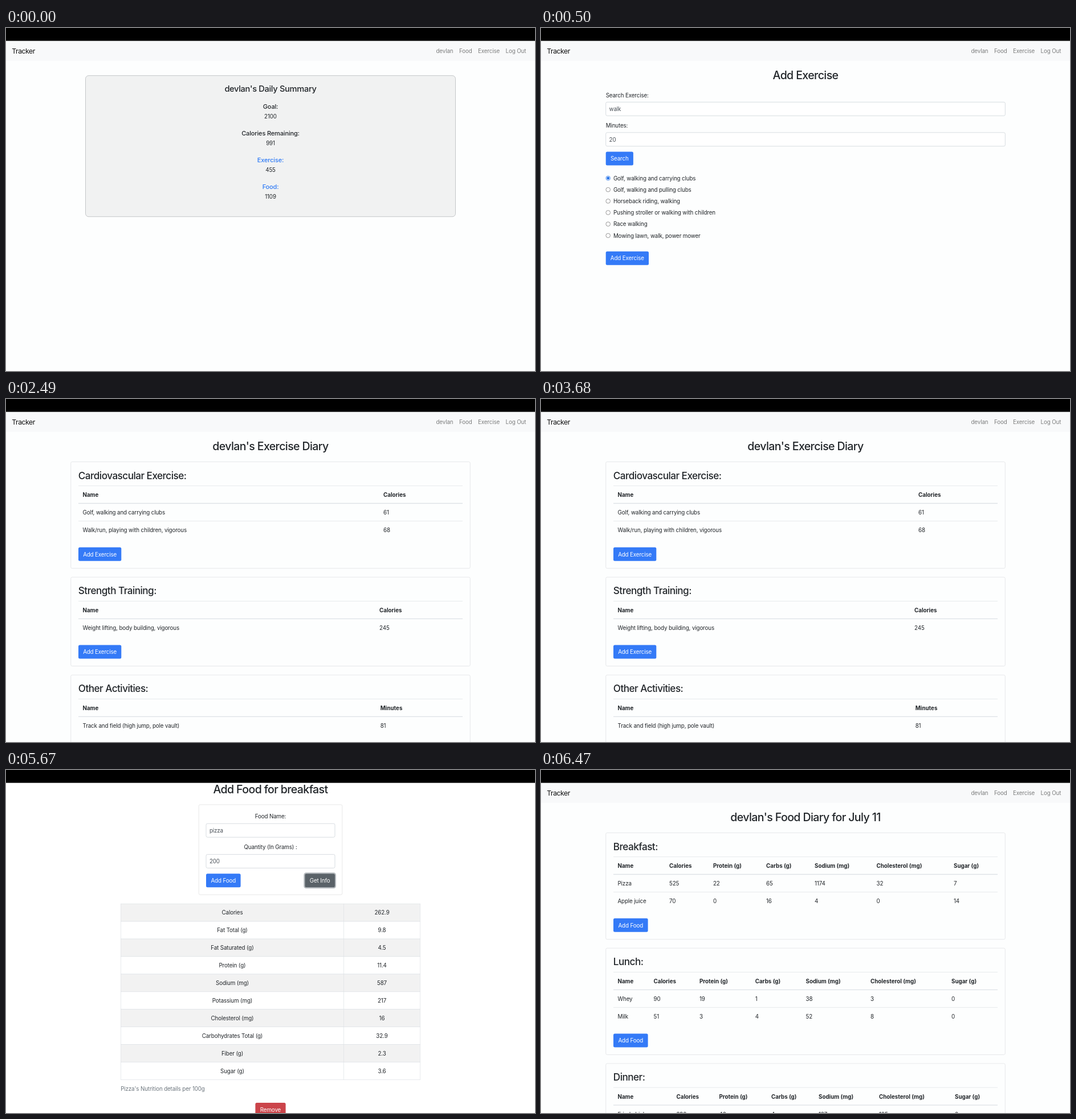
An HTML page for the animation above (8 s loop, 928 px wide and 603 px high).

```html
<!DOCTYPE html>
<html lang="en">
<head>
<meta charset="utf-8">
<title>Tracker</title>
<style>
html, body { margin: 0; width: 100%; height: 100%; overflow: hidden; background: #fff; }
svg { display: block; width: 928px; height: 603px; }
text { font: 400 9.78px Inter, "Open Sans", sans-serif; font-optical-sizing: none; letter-spacing: -.012em; fill: #212529; }
.mid { text-anchor: middle; }
.h2 { font-size: 19.55px; font-weight: 500; letter-spacing: -.031em; }
.h3 { font-size: 17.11px; font-weight: 500; letter-spacing: -.03em; }
.h4 { font-size: 14.67px; font-weight: 500; letter-spacing: -.023em; }
.h5 { font-size: 11px; font-weight: 500; letter-spacing: -.014em; }
.brand { font-size: 12.22px; letter-spacing: -.037em; fill: #111; }
.th { font-weight: 700; letter-spacing: 0; }
.link { fill: #2f7bf6; }
.nav { fill: #7c7d7d; }
.field { fill: #495057; }
.note { fill: #6c757d; }
.label { fill: #fff; }
</style>
</head>
<body>
<svg id="stage" viewBox="0 0 928 603"></svg>
<script>
const USER = 'devlan', BLUE = '#347af7', LINE = '#dee2e6', LEFT = 113.7, MID = 464;

const text = (x, y, s, cls = '') => `<text x="${x}" y="${y}" class="${cls}">${s}</text>`;
const center = (y, s, cls = '', x = MID) => text(x, y, s, 'mid ' + cls);
const box = (x, y, w, h, fill, stroke = 'none', r = 2.5, sw = .7) =>
  `<rect x="${x}" y="${y}" width="${w}" height="${h}" rx="${r}" fill="${fill}" stroke="${stroke}" stroke-width="${sw}"/>`;
const rule = (x1, y1, x2, y2, sw = .7) =>
  `<path d="M${x1} ${y1}L${x2} ${y2}" stroke="${LINE}" stroke-width="${sw}"/>`;
const button = (x, y, w, s, fill = BLUE) =>
  box(x, y, w, 24, fill) + center(y + 15.7, s, 'label', x + w / 2);
const input = (x, y, w, s) =>
  box(x, y, w, 24, '#fff', '#c8ced4') + text(x + 5.9, y + 15.7, s, 'field');

const page = body => box(0, 22, 928, 581, '#fdfefe', 'none', 0) +
  box(0, 22, 928, 35.5, '#f8f9fa', 'none', 0) + text(10.3, 45.2, 'Tracker', 'brand') +
  [[754.5, USER], [795, 'Food'], [828, 'Exercise'], [876.5, 'Log Out']]
    .map(([x, s]) => text(x, 44.3, s, 'nav')).join('') + body;

// Titled card with a table; the first row holds the headings.
function card(top, title, xs, rows, action, width) {
  const [head, ...data] = rows.map(r => r.split('|'));
  const extra = 31 * (data.length - 1);
  const row = (cells, y, cls) => cells.map((s, i) => text(xs[i], y, s, cls)).join('');
  return box(LEFT, top, 700.6, 156.3 + extra, 'none', '#dfe0e2') +
    text(126.8, top + 30.1, title, 'h3') +
    rule(127, top + 42.2, 801, top + 42.2) + row(head, top + 61.5, 'th') +
    rule(127, top + 73.1, 801, top + 73.1, 1.3) +
    data.map((cells, i) => row(cells, top + 92.9 + 31 * i) +
      (i ? rule(127, top + 73.2 + 31 * i, 801, top + 73.2 + 31 * i) : '')).join('') +
    button(127, top + 119.4 + extra, width, action);
}

function summary() {
  const items = [['Goal:', 2100], ['Calories Remaining:', 991], ['Exercise:', 455], ['Food:', 1109]];
  return page(box(139.5, 83.7, 649, 248, '#f1f2f2', '#c4c7c9', 5.5, 1) +
    center(111.7, USER + "'s Daily Summary", 'h4') +
    items.map(([name, n], i) =>
      center(141.9 + 47 * i, name, i > 1 ? 'h5 link' : 'h5') + center(158.7 + 47 * i, n)).join(''));
}

function addExercise() {
  const options = ['Golf, walking and carrying clubs', 'Golf, walking and pulling clubs',
    'Horseback riding, walking', 'Pushing stroller or walking with children',
    'Race walking', 'Mowing lawn, walk, power mower'];
  const radio = (s, i) => {
    const y = 264 + 20.17 * i;
    return `<circle cx="117.7" cy="${y}" r="3.8" fill="#fff" stroke="${i ? '#767676' : '#1f6fe8'}" stroke-width=".75"/>` +
      (i ? '' : `<circle cx="117.7" cy="${y}" r="2.4" fill="#1f6fe8"/>`) + text(126.9, y + 3.8, s);
  };
  return page(center(90.3, 'Add Exercise', 'h2') +
    text(LEFT, 121.6, 'Search Exercise:') + input(LEFT, 130.3, 700.6, 'walk') +
    text(LEFT, 175.1, 'Minutes:') + input(LEFT, 183.8, 700.6, '20') +
    button(LEFT, 217.4, 48.2, 'Search') + options.map(radio).join('') +
    button(LEFT, 392.7, 75.3, 'Add Exercise'));
}

function exerciseDiary() {
  return page(center(90.3, USER + "'s Exercise Diary", 'h2') +
    card(110.4, 'Cardiovascular Exercise:', [134.5, 662],
      ['Name|Calories', 'Golf, walking and carrying clubs|61', 'Walk/run, playing with children, vigorous|68'],
      'Add Exercise', 75.3) +
    card(313.2, 'Strength Training:', [134.5, 655],
      ['Name|Calories', 'Weight lifting, body building, vigorous|245'], 'Add Exercise', 75.3) +
    card(485.2, 'Other Activities:', [134.5, 656.7],
      ['Name|Minutes', 'Track and field (high jump, pole vault)|81'], 'Add Exercise', 75.3));
}

function addFood() {
  const facts = [['Calories', 262.9], ['Fat Total (g)', 9.8], ['Fat Saturated (g)', 4.5],
    ['Protein (g)', 11.4], ['Sodium (mg)', 587], ['Potassium (mg)', 217], ['Cholesterol (mg)', 16],
    ['Carbohydrates Total (g)', 32.9], ['Fiber (g)', 2.3], ['Sugar (g)', 3.6]];
  const row = ([name, n], i) => {
    const y = 235.2 + 30.92 * i;
    return box(201.5, y, 525.2, 30.92, i % 2 ? '#fff' : '#f2f2f2', LINE, 0) +
      center(y + 19.2, name, '', 397) + center(y + 19.2, n, '', 659.5);
  };
  return box(0, 22, 928, 581, '#fff', 'none', 0) +
    center(40.8, 'Add Food for breakfast', 'h2') +
    box(338.2, 60.9, 251.6, 158.4, 'none', '#dfdfdf') +
    center(85.2, 'Food Name:') + input(351, 94.2, 226, 'pizza') +
    center(139.4, 'Quantity (In Grams) :') + input(351, 148.4, 226, '200') +
    button(351, 182.3, 60.6, 'Add Food') +
    box(523.3, 181.3, 54.7, 26, 'none', '#b5babe', 3.4, 2) +
    button(524.3, 182.3, 52.7, 'Get Info', '#5a6268') +
    facts.map(row).join('') + rule(592.5, 235, 592.5, 544.4) +
    text(201.2, 563.5, "Pizza's Nutrition details per 100g", 'note') +
    button(437.4, 585, 53.2, 'Remove', '#cb444a');
}

function foodDiary() {
  const head = 'Name|Calories|Protein (g)|Carbs (g)|Sodium (mg)|Cholesterol (mg)|Sugar (g)';
  const meal = (top, title, xs, ...rows) => card(top, title, xs, [head, ...rows], 'Add Food', 60.6);
  return page(center(90.3, USER + "'s Food Diary for July 11", 'h2') +
    meal(110.4, 'Breakfast:', [134.5, 225, 302, 395, 480, 588.5, 724],
      'Pizza|525|22|65|1174|32|7', 'Apple juice|70|0|16|4|0|14') +
    meal(313.2, 'Lunch:', [134.5, 197.5, 278, 375.7, 464.5, 578, 720],
      'Whey|90|19|1|38|3|0', 'Milk|51|3|4|52|8|0') +
    meal(516, 'Dinner:', [134.5, 237.5, 312.5, 404, 487, 593, 726],
      'Fried chicken|290|40|4|137|105|0'));
}

const scenes = [summary, addExercise, exerciseDiary, addFood, foodDiary];
const ends = [500, 2490, 4480, 6470, 8000];
const stage = document.getElementById('stage');
stage.innerHTML = scenes.map(draw => `<g>${draw()}</g>`).join('') +
  box(0, 0, 928, 22.6, '#000', 'none', 0);
const groups = [...stage.children].slice(0, scenes.length);

function tick() {
  const t = performance.now() % 8000;
  const now = ends.findIndex(end => t < end);
  groups.forEach((g, i) => g.style.display = i === now ? '' : 'none');
  requestAnimationFrame(tick);
}
tick();
</script>
</body>
</html>
```
